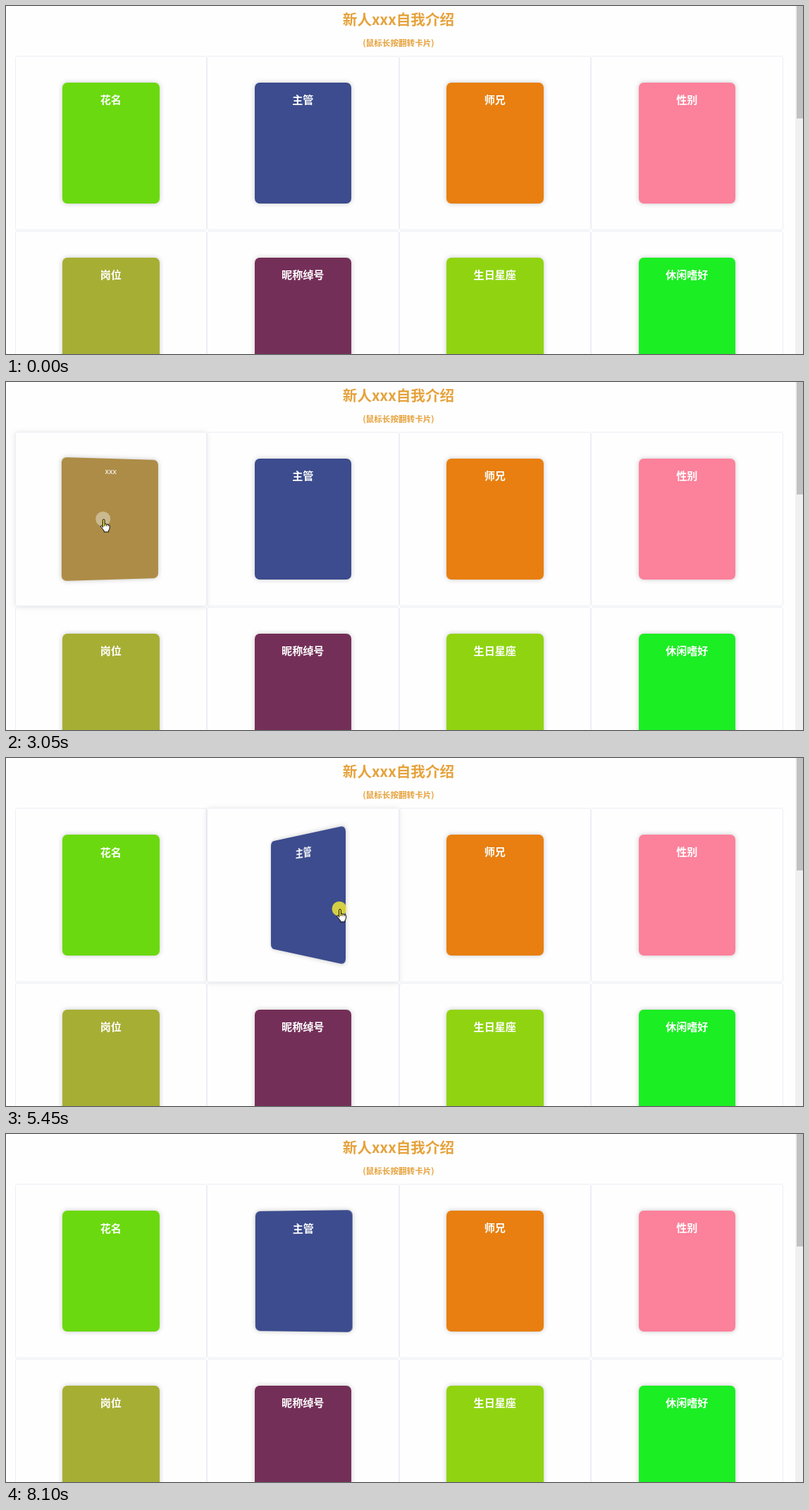
Write an HTML page that moves like this. It is 1131x495 px and loops after 8.15 s.

```html
<!DOCTYPE html>
<html lang="zh-CN">
<head>
<meta charset="utf-8">
<title>自我介绍</title>
<style>
html, body { margin: 0; width: 100%; height: 100%; overflow: hidden; }
body {
  position: relative;
  background: #fefefe;
  font-family: "Noto Sans CJK SC", "Noto Sans CJK", "Noto Sans CJK JP", sans-serif;
}
#stage { position: absolute; left: 0; top: 0; width: 1131px; height: 495px; overflow: hidden; }
.head {
  position: absolute; left: 257px; width: 600px;
  text-align: center; white-space: nowrap;
  font-weight: 700; color: #e6a23c;
}
#title { top: 3px; font-size: 20.6px; line-height: 30px; }
#hint { top: 42px; font-size: 11.6px; line-height: 20px; }
.cell {
  position: absolute; box-sizing: border-box;
  width: 272.5px; height: 248.7px;
  border: 1px solid #ebeef5; border-radius: 3px;
}
.cell.over { box-shadow: 0 1px 8px rgba(0, 0, 0, .1); }
.card {
  position: absolute; width: 137.5px; height: 172px;
  perspective: 343.75px;
}
.face {
  position: absolute; inset: 0;
  border-radius: 7px;
  box-shadow: 0 0 7px rgba(0, 0, 0, .22);
  backface-visibility: hidden;
  text-align: center; color: #fff;
}
.front { font-weight: 700; font-size: 15.1px; line-height: 20px; }
.front span { display: inline-block; margin-top: 13.5px; }
.front span.marked { background: #1a87d8; }
.back { font-size: 11px; line-height: 16px; }
.back span { display: inline-block; margin-top: 9px; }
#track { position: absolute; left: 1120px; top: 0; width: 11px; height: 495px; background: #f1f0f1; }
#thumb { position: absolute; left: 2px; top: 0; width: 9px; height: 160px; background: #c1c1c1; }
#pointer { position: absolute; left: 0; top: 0; overflow: visible; }
</style>
</head>
<body>
<div id="stage">
  <div class="head" id="title">新人xxx自我介绍</div>
  <div class="head" id="hint">(鼠标长按翻转卡片)</div>
  <div id="grid"></div>
  <div id="track"><div id="thumb"></div></div>
  <svg id="pointer" width="16" height="20">
    <defs>
      <radialGradient id="lit" gradientUnits="userSpaceOnUse" cx="4" cy="0" r="10.5">
        <stop offset=".97" stop-color="#f4ee4a"/>
        <stop offset="1" stop-color="#fff"/>
      </radialGradient>
    </defs>
    <circle id="glow" cx="4" cy="0" r="10.5"/>
    <path id="hand" stroke="#000" stroke-linejoin="round" d="M3.6 12V2Q3.6.6 5 .6T6.4 2V7.5Q7.8 6 9 7.8Q10.6 6.8 11.4 8.4Q13.6 7.8 13.5 10V13Q13.2 15 12 16.4V18.5H5.4V16.6L1 11.4Q.2 9.6 1.8 9.5Q2.8 9.8 3.6 11Z"/>
    <path fill="none" stroke="#000" stroke-width=".8" d="M6.4 7.5v3M9 8v2.6M11.4 8.6v2"/>
  </svg>
</div>
<script>
const LOOP = 8150, FLIP = 1800;

const cards = [
  ['花名', '#6bd90f', '#ad8c47'], ['主管', '#3c4c8e', '#c9487c'],
  ['师兄', '#e87f10'], ['性别', '#fc819b'],
  ['岗位', '#a7ae34'], ['昵称绰号', '#742f58'],
  ['生日星座', '#90d411'], ['休闲嗜好', '#1bee23']
];

// card index, press and release times, colour of the click mark
const presses = [
  { card: 0, down: 1690, up: 3500, glow: 'rgba(222,214,192,.6)' },
  { card: 1, down: 5145, up: 6605, glow: 'rgba(250,240,50,.8)' }
];

// time, x, y of the finger tip
const path = [
  [70, 1062, 488], [300, 900, 405], [560, 690, 315], [810, 515, 263],
  [1050, 330, 238], [1300, 102, 192], [1500, 129, 187], [2500, 129, 187],
  [3300, 143, 199], [3820, 145, 201], [4130, 300, 270], [4320, 380, 299],
  [4740, 476, 219], [5050, 474, 215], [6605, 474, 215], [6720, 500, 222],
  [6850, 690, 292], [7000, 978, 394], [7110, 1120, 478]
];

const $ = id => document.getElementById(id);

function add(parent, cls, style = {}) {
  const el = document.createElement('div');
  el.className = cls;
  Object.assign(el.style, style);
  return parent.appendChild(el);
}

function addFace(card, cls, color, text) {
  const face = add(card, 'face ' + cls, { background: color });
  face.label = face.appendChild(document.createElement('span'));
  face.label.textContent = text;
  return face;
}

const views = cards.map(([text, front, back], i) => {
  const col = i % 4, row = i >> 2;
  const cell = add($('grid'), 'cell', {
    left: 12.5 + col * 272.5 + 'px', top: 70.7 + row * 248.9 + 'px'
  });
  const card = add($('grid'), 'card', {
    left: 80 + col * 272.5 + 'px', top: 108.8 + row * 248.9 + 'px'
  });
  return {
    cell,
    front: addFace(card, 'front', front, text),
    back: back && addFace(card, 'back', back, 'xxx')
  };
});

const bezier = (a, b, u) => 3 * a * u * (1 - u) ** 2 + 3 * b * u * u * (1 - u) + u ** 3;

function ease(x) {
  if (x <= 0) return 0;
  if (x >= 1) return 1;
  let lo = 0, hi = 1;
  for (let i = 0; i < 24; i++) {
    const mid = (lo + hi) / 2;
    if (bezier(.25, .25, mid) < x) lo = mid; else hi = mid;
  }
  return bezier(.1, 1, lo);
}

function turn({ down, up }, t) {
  const open = ease((Math.min(t, up) - down) / FLIP);
  return 180 * open * (1 - ease((t - up) / FLIP));
}

function pointAt(t) {
  const i = path.findIndex(p => p[0] > t);
  if (i < 1) return null;
  const [t0, x0, y0] = path[i - 1], [t1, x1, y1] = path[i];
  const k = (t - t0) / (t1 - t0);
  return [x0 + (x1 - x0) * k, y0 + (y1 - y0) * k];
}

function draw(t) {
  for (const p of presses) {
    const { front, back } = views[p.card], a = turn(p, t);
    front.style.transform = `rotateY(${-a}deg)`;
    back.style.transform = `rotateY(${180 - a}deg)`;
  }
  views[0].front.label.classList.toggle('marked', t > 2500 && t < presses[1].down);

  const pos = pointAt(t), held = presses.find(p => t >= p.down && t < p.up);
  const over = pos && pos[1] > 71
    ? Math.floor((pos[0] - 12.5) / 272.5) + (pos[1] > 319 ? 4 : 0) : -1;
  views.forEach((v, i) => v.cell.classList.toggle('over', i === over));

  $('pointer').style.display = pos ? 'block' : 'none';
  if (pos) $('pointer').style.transform = `translate(${pos[0] - 5}px, ${pos[1] - .5}px)`;
  $('glow').setAttribute('fill', held ? held.glow : 'none');
  $('hand').setAttribute('fill', held ? 'url(#lit)' : '#fff');
}

const begin = performance.now();
function tick() {
  draw((performance.now() - begin) % LOOP);
  requestAnimationFrame(tick);
}
tick();
</script>
</body>
</html>
```
